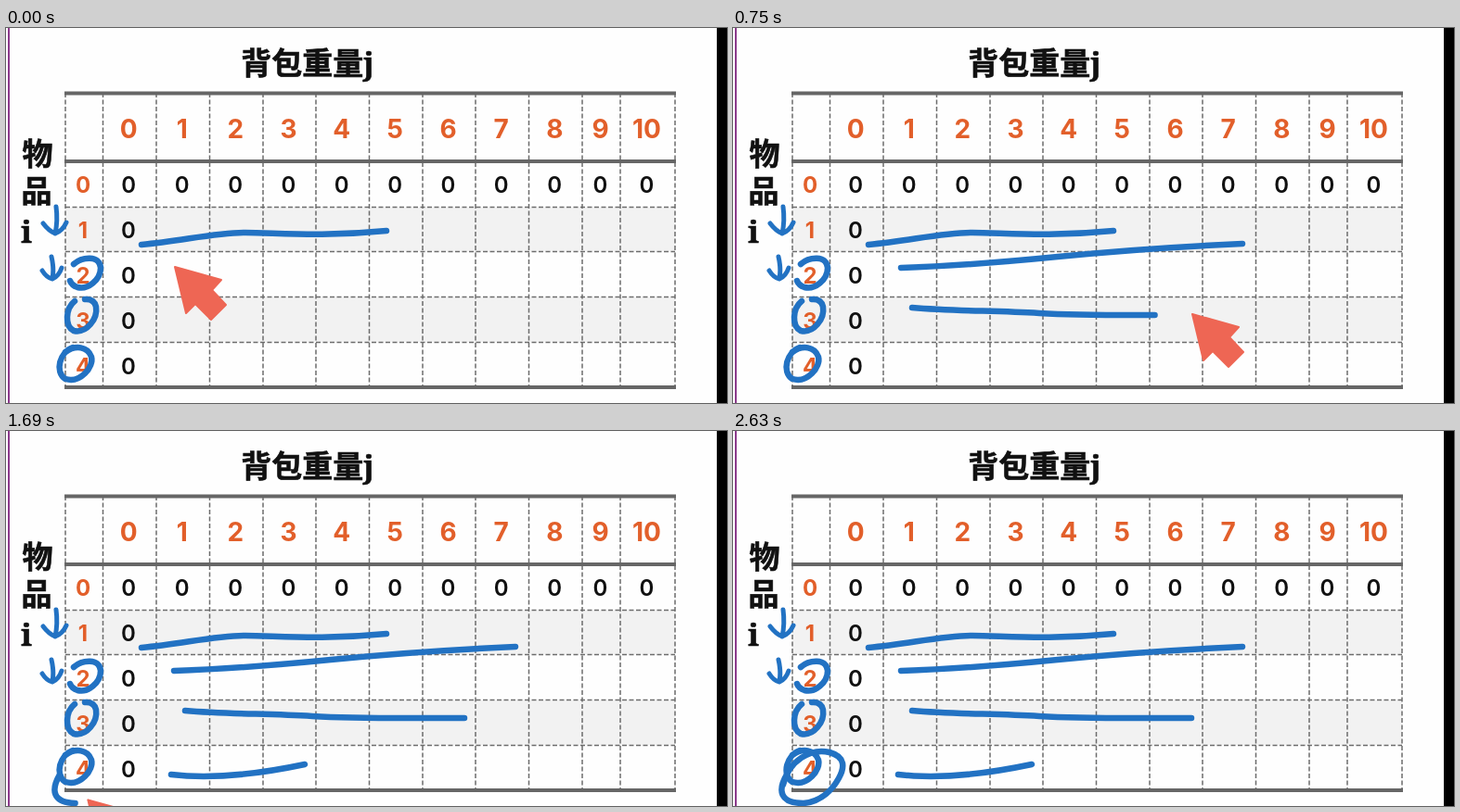
Recreate the animation shown at these times as an HTML page. Size 777x405 px, loop 2.7 s.

```html
<!DOCTYPE html>
<html lang="zh-CN">
<head>
<meta charset="utf-8">
<style>
  html, body { margin: 0; width: 100%; height: 100%; overflow: hidden; background: #fefefe; }
  svg { display: block; }
  text { font: 600 24px Inter, sans-serif; text-anchor: middle; fill: #111; }
  .label { font: 900 33px "Noto Serif", "Noto Sans CJK SC", sans-serif; stroke: #111; stroke-width: 0.6; }
  .orange { font-weight: 700; fill: #e25f2a; }
  .head { font-size: 28px; }
  .ink { fill: none; stroke: #2272c3; stroke-width: 6.5; stroke-linecap: round; stroke-linejoin: round; }
  .arrow { stroke-width: 5; }
  .solid { stroke: #666; stroke-width: 4; }
  .dash { stroke: #6c6c6c; stroke-width: 1.5; stroke-dasharray: 5 2.5; }
</style>
</head>
<body>
<svg id="stage" width="777" height="405" viewBox="0 0 777 405">
  <path d="M3 0V405" stroke="#8b3a8b" stroke-width="2"/>
  <rect x="766" width="11" height="405"/>
  <path d="M64 194H721V241H64ZM64 291H721V339H64Z" fill="#f2f2f2"/>
  <g id="table"></g>
  <text class="label" x="325" y="50">背包重量j</text>
  <text class="label" x="34" y="148">物</text>
  <text class="label" x="33" y="188">品</text>
  <text class="label" x="22" y="232">i</text>
  <g class="ink">
    <path class="arrow" d="M54 193Q56 208 53 222M40 211Q46 219 53 222Q61 219 65 210"/>
    <path class="arrow" d="M49 247Q52 260 50 270M39 262Q44 270 50 271Q57 268 60 259"/>
    <path d="M73 255C82 247 101 245 102 259C102 272 88 283 77 280Q71 278 69 273"/>
    <path d="M74 295C64 303 63 322 73 327C87 330 99 314 97 301Q95 292 85 293"/>
    <path d="M72 345C58 350 52 371 64 379C80 384 95 366 92 355C88 344 75 342 64 350"/>
    <path d="M146 234C190 230 225 221 258 221S340 226 410 219"/>
  </g>
  <g id="strokes" class="ink"></g>
  <g id="ripple" fill="none" stroke="#d98080" stroke-width="1.5">
    <circle r="10"/><circle id="ring"/><circle r="4" fill="#e8604f" stroke="none"/>
  </g>
  <path id="cursor" d="M1 1L51 15L41 26L56 42L40 58L23 41L13 51Z"
        fill="#ee6654" stroke="#ee6654" stroke-width="2" stroke-linejoin="round"/>
</svg>
<script>
const $ = id => document.getElementById(id);
const SVG = 'http://www.w3.org/2000/svg';
function add(parent, tag, attrs, text = '') {
  const el = document.createElementNS(SVG, tag);
  for (const key in attrs) el.setAttribute(key, attrs[key]);
  el.textContent = text;
  return parent.appendChild(el);
}

// Table
const table = $('table');
const columns = [64, 104.5, 162, 219.5, 277, 334, 391.5, 449, 506, 563.5, 621, 662, 721];
const line = (d, cls) => add(table, 'path', { d, class: cls });
const cell = (x, y, text, cls = '') => add(table, 'text', { x, y, class: cls }, text);
columns.forEach(x => line(`M${x} 70V388`, 'dash'));
[193.5, 241.5, 290.5, 339.5].forEach(y => line(`M64 ${y}H721`, 'dash'));
[70.5, 144, 388].forEach(y => line(`M63 ${y}H722`, 'solid'));
for (let i = 0; i < 11; i++) {
  const x = (columns[i + 1] + columns[i + 2]) / 2 - 1;
  cell(x, 119, i, 'head orange');
  cell(x, 178, 0);
}
for (let row = 0; row < 5; row++) {
  const y = 178 + row * 49;
  cell(83, y, row, 'orange');
  if (row) cell(132, y, 0);
}

// Pen strokes: path, first tick, last tick
const strokes = [
  ['M181 259C240 257 290 253 350 247S480 236 549 233', 0, 3],
  ['M193 302C240 306 280 305 330 308S420 310 494 310', 6, 11],
  ['M178 371C220 376 270 371 322 360', 16, 18.9],
  ['M58 371C48 388 50 402 76 402C96 400 108 386 114 375S122 352 104 347C84 342 60 356 54 382', 22, 32],
].map(([d, start, end]) => {
  const el = add($('strokes'), 'path', { d });
  return { el, start, end, length: el.getTotalLength() };
});
const ripples = [[181, 258, 5], [191, 300, 15], [176, 369, 21]];
const TICK = 67.5, LOOP = 2700, INK_LAG = 0.65, TRAVEL = 2.1, LIFT = 8;
const clamp = v => Math.max(0, Math.min(1, v));
const progress = (s, tick) => clamp((tick - s.start) / (s.end - s.start));
const pointAt = (s, p) => s.el.getPointAtLength(s.length * p);

function draw(time) {
  const tick = Math.min(39, Math.floor((time % LOOP + 10) / TICK));
  for (const s of strokes) {
    const p = progress(s, tick - INK_LAG);
    s.el.style.strokeDasharray = `${s.length * p} ${s.length + 9}`;
    s.el.style.display = p ? '' : 'none';
  }

  // The cursor follows the pen, then swings in a shallow arc to the next stroke
  const current = strokes.findLastIndex(s => tick >= s.start);
  const s = strokes[current], next = strokes[current + 1];
  const from = pointAt(s, progress(s, tick));
  const to = next ? pointAt(next, 0) : { x: 150, y: 430 };
  const k = clamp((tick - s.end) / TRAVEL);
  const x = from.x + (to.x - from.x) * k;
  const y = from.y + (to.y - from.y) * k - LIFT * Math.sin(Math.PI * k);
  $('cursor').setAttribute('transform', `translate(${x} ${y - 2})`);

  const ripple = ripples.find(r => tick >= r[2] && tick < r[2] + 3);
  $('ripple').style.display = ripple ? '' : 'none';
  if (ripple) {
    const age = tick - ripple[2];
    $('ripple').setAttribute('transform', `translate(${ripple[0]} ${ripple[1]})`);
    $('ripple').style.opacity = [0.6, 0.9, 0.4][age];
    $('ring').setAttribute('r', 10 + 8 * Math.min(age, 1));
  }
}

function loop() {
  draw(performance.now());
  requestAnimationFrame(loop);
}
loop();
</script>
</body>
</html>
```
